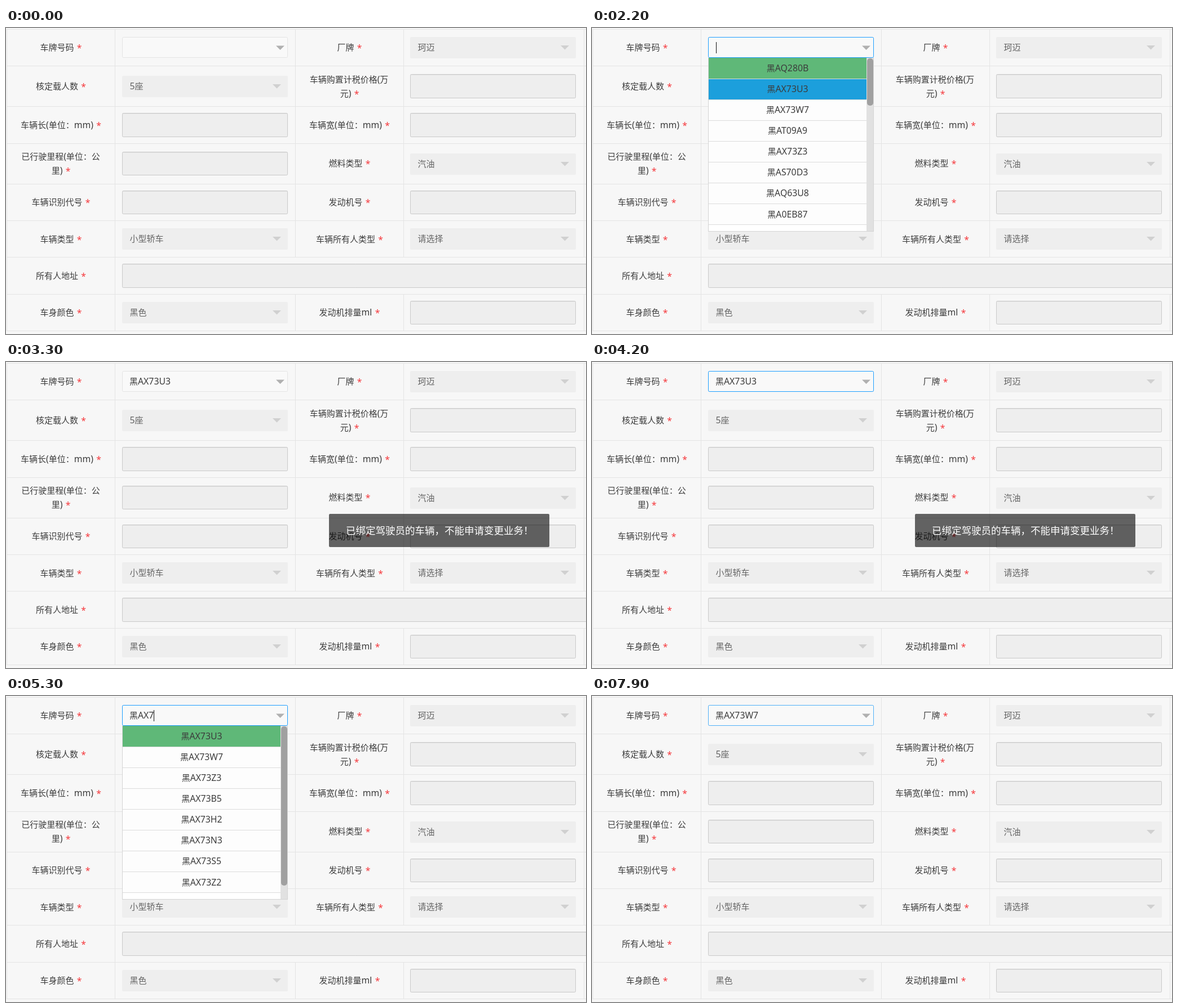
An HTML page with a canvas that plays this animation: 1029 by 544 pixels, repeating every 8 s.

```html
<!DOCTYPE html>
<html lang="zh-CN">
<head>
<meta charset="utf-8">
<style>
  html, body { margin: 0; width: 100%; height: 100%; overflow: hidden; background: #f7f7f7; }
  canvas { display: block; }
</style>
</head>
<body>
<canvas id="stage" width="1029" height="544"></canvas>
<script>
const ctx = document.getElementById('stage').getContext('2d');
const LOOP = 8000;
const BG = '#f7f7f7', INK = '#3c3c3c', MUTED = '#646464', RED = '#f5383c';
const HAN = '"Noto Sans CJK SC", "Noto Sans CJK", sans-serif';
const LATIN = '"Noto Sans", "Open Sans", sans-serif';
const LEFT = 206, RIGHT = 717, FIELD_W = 294;

const ROW_LINES = [2, 67, 139, 205, 277, 342, 407, 473, 538];
const LABELS = [
  ['车牌号码', 97, 35], ['厂牌', 609, 35],
  ['核定载人数', 97, 104], ['元)', 609, 117],
  ['车辆长(单位：mm)', 97, 173], ['车辆宽(单位：mm)', 609, 173],
  ['里)', 97, 254], ['燃料类型', 609, 241],
  ['车辆识别代号', 97, 310], ['发动机号', 609, 310],
  ['车辆类型', 97, 376], ['车辆所有人类型', 609, 376],
  ['所有人地址', 97, 441],
  ['车身颜色', 97, 506], ['发动机排量ml', 609, 506]
];
const SELECTS = [
  ['珂迈', RIGHT, 16], ['5座', LEFT, 85], ['汽油', RIGHT, 223],
  ['小型轿车', LEFT, 356], ['请选择', RIGHT, 356], ['黑色', LEFT, 487]
];
const INPUTS = [
  [RIGHT, 82.3], [LEFT, 151.3], [RIGHT, 151.3], [LEFT, 220],
  [LEFT, 289], [RIGHT, 289], [LEFT, 419.3, 900], [RIGHT, 485]
];
const plates = codes => codes.split(' ').map(code => '黑' + code);
const ALL = plates('AQ280B AX73U3 AX73W7 AT09A9 AX73Z3 AS70D3 AQ63U8 A0EB87');
const MATCHES = plates('AX73U3 AX73W7 AX73Z3 AX73B5 AX73H2 AX73N3 AX73S5 AX73Z2');

// Each track is a list of [start time, value].
const VALUE = [[0, ''], [2700, '黑AX73U3'], [5000, '黑AX73U'], [5200, '黑AX73'], [5300, '黑AX7'],
  [5600, '黑AX'], [6200, '黑A'], [6800, '黑'], [7900, '黑AX73W7']];
const CARET = [[0, 0], [900, 1], [1400, 0], [1900, 1], [2400, 0], [4300, 1], [4700, 0],
  [5000, 1], [6500, 0], [7100, 1], [7600, 0]];
const OPTIONS = [[0, null], [900, ALL], [2700, null], [4300, ['黑AX73U3']],
  [5200, MATCHES], [6600, ALL], [7900, null]];
const THUMB_END = [[0, 138], [5200, 337], [5800, 138]];
const HOVER = [[0, -1], [2100, 0], [2200, 1], [2700, -1], [7400, 0], [7500, 1], [7600, 2]];

const at = (track, t) => track.filter(step => step[0] <= t).pop()[1];
const clamp = v => Math.max(0, Math.min(1, v));
const lerp = (a, b, p) => a + (b - a) * p;

function fill(color, x, y, w, h, r = 0) {
  ctx.fillStyle = color;
  ctx.beginPath();
  ctx.roundRect(x, y, w, h, r);
  ctx.fill();
}

function outline(color, x, y, w, h) {
  ctx.strokeStyle = color;
  ctx.lineWidth = 1;
  ctx.beginPath();
  ctx.roundRect(x + .5, y + .5, w - 1, h - 1, 2);
  ctx.stroke();
}

// Han and Latin runs use their own face; returns the total width.
function text(str, x, y, color, draw = true) {
  const start = x;
  ctx.textAlign = 'left';
  ctx.fillStyle = color;
  for (const run of str.match(/[ -~]+|[^ -~]+/g) || []) {
    ctx.font = /[ -~]/.test(run) ? '15.8px ' + LATIN : '15px ' + HAN;
    if (draw) ctx.fillText(run, x, Math.round(y + 5));
    x += ctx.measureText(run).width;
  }
  return x - start;
}
const widthOf = str => text(str, 0, 0, INK, false);
const centred = (str, cx, y) => text(str, cx - widthOf(str) / 2, y, INK);

function label([str, cx, y]) {
  const w = widthOf(str), x = cx - (w + 13) / 2;
  text(str, x, y, INK);
  text('*', x + w + 5.3, y + 1, RED);
}

function arrow(x, y, color) {
  ctx.fillStyle = color;
  ctx.beginPath();
  ctx.moveTo(x, y);
  ctx.lineTo(x + 15, y);
  ctx.lineTo(x + 7.5, y + 7.5);
  ctx.fill();
}

function select([str, x, y]) {
  fill('#eee', x, y, FIELD_W, 38, 2);
  text(str, x + 13.5, y + 19.3, MUTED);
  arrow(x + 267, y + 15, '#d0d0d0');
}

function input([x, y, w = FIELD_W]) {
  const top = Math.round(y), h = Math.round(y + 42.4) - top;
  fill('#eee', x, top, w, h, 2);
  fill('rgba(0,0,0,.05)', x + 1, top + 1, w - 2, 1);
  outline('#c9c9c9', x, top, w, h);
}

function form() {
  fill(BG, 0, 0, 1029, 544);
  const line = '#e4e4e4';
  ROW_LINES.forEach(y => fill(line, 1, y, 1028, 1));
  [1, 193].forEach(x => fill(line, x, 2, 1, 537));
  [513, 705, 1025].forEach(x => {
    fill(line, x, 2, 1, 406);
    fill(line, x, 473, 1, 66);
  });
  LABELS.forEach(label);
  centred('车辆购置计税价格(万', 608.5, 92);
  centred('已行驶里程(单位：公', 97, 229);
  SELECTS.forEach(select);
  INPUTS.forEach(input);
}

function focusLevel(t) {
  if (t < 2700) return clamp((t - 400) / 300);
  if (t < 3900) return clamp((2900 - t) / 300);
  return t < 7900 ? clamp((t - 3800) / 300) : .75;
}

function squiggle(x, end) {
  ctx.strokeStyle = RED;
  ctx.lineWidth = 1.2;
  ctx.beginPath();
  for (let i = 0; x <= end; x += 2, i++) ctx.lineTo(x, i % 2 ? 42 : 44);
  ctx.stroke();
}

function plateField(t) {
  const value = at(VALUE, t), w = widthOf(value);
  fill('#f9f9f9', LEFT, 16, FIELD_W, 37, 2);
  outline('#e4e4e4', LEFT, 16, FIELD_W, 37);
  ctx.globalAlpha = focusLevel(t);
  outline('#1e9fff', LEFT, 16, FIELD_W, 37);
  ctx.globalAlpha = 1;
  arrow(479, 31.5, '#b0b0b0');
  text(value, 219, 35, INK);
  if (t >= 4300 && t < 5000) squiggle(234, 219 + w);
  if (at(CARET, t)) fill('#111', Math.max(220, Math.round(219 + w - .6)), 25, 1, 20);
}

function dropdown(t) {
  const options = at(OPTIONS, t);
  if (!options) return;
  const single = options.length === 1;
  const h = single ? 39 : 309, rowW = single ? 292 : 280, hover = at(HOVER, t);
  const rowTop = i => i ? Math.round(52.6 + 37.05 * i) : 53;
  fill('#d4d4d4', LEFT, 53, FIELD_W, h);
  fill('#fff', LEFT + 1, 53, FIELD_W - 2, h - 1);
  options.forEach((plate, i) => {
    const top = rowTop(i), bottom = rowTop(i + 1);
    const color = i === hover ? '#1c9fdc' : i ? '#fdfdfd' : '#5fb878';
    fill(color, LEFT + 1, top, rowW, bottom - top);
    centred(plate, LEFT + 1 + rowW / 2, 71.8 + 37.1 * i);
  });
  options.forEach((_, i) => {
    if (i !== hover - 1 || i === 0) fill('#dcdcdc', LEFT + 1, rowTop(i + 1), rowW, 1);
  });
  if (single) return;
  fill('#e1e1e1', 487, 53, 12, 308);
  fill('#a0a0a0', 488, 54, 11, at(THUMB_END, t) - 54, 5);
}

function toast(t) {
  if (t < 3100 || t >= 5000) return;
  const enter = 1 - (1 - clamp((t - 3030) / 270)) ** 2;
  const leave = clamp((t - 4732) / 200);
  const scale = lerp(.5, 1, enter) *
    (leave < .3 ? lerp(1, 1.05, leave / .3) : lerp(1.05, .7, (leave - .3) / .7));
  ctx.save();
  ctx.globalAlpha = enter * (1 - leave);
  ctx.translate(768.5, 299.5);
  ctx.scale(scale, scale);
  fill('rgba(0,0,0,.6)', -195.5, -29.5, 391, 59, 2);
  ctx.fillStyle = '#fff';
  ctx.font = '17.5px ' + HAN;
  ctx.fillText('已绑定驾驶员的车辆，不能申请变更业务！', -165.5, 6.5);
  ctx.restore();
}

function frame(now) {
  const t = Math.floor(now % LOOP / 100) * 100;
  form();
  plateField(t);
  dropdown(t);
  toast(t);
  requestAnimationFrame(frame);
}
requestAnimationFrame(frame);
</script>
</body>
</html>
```
